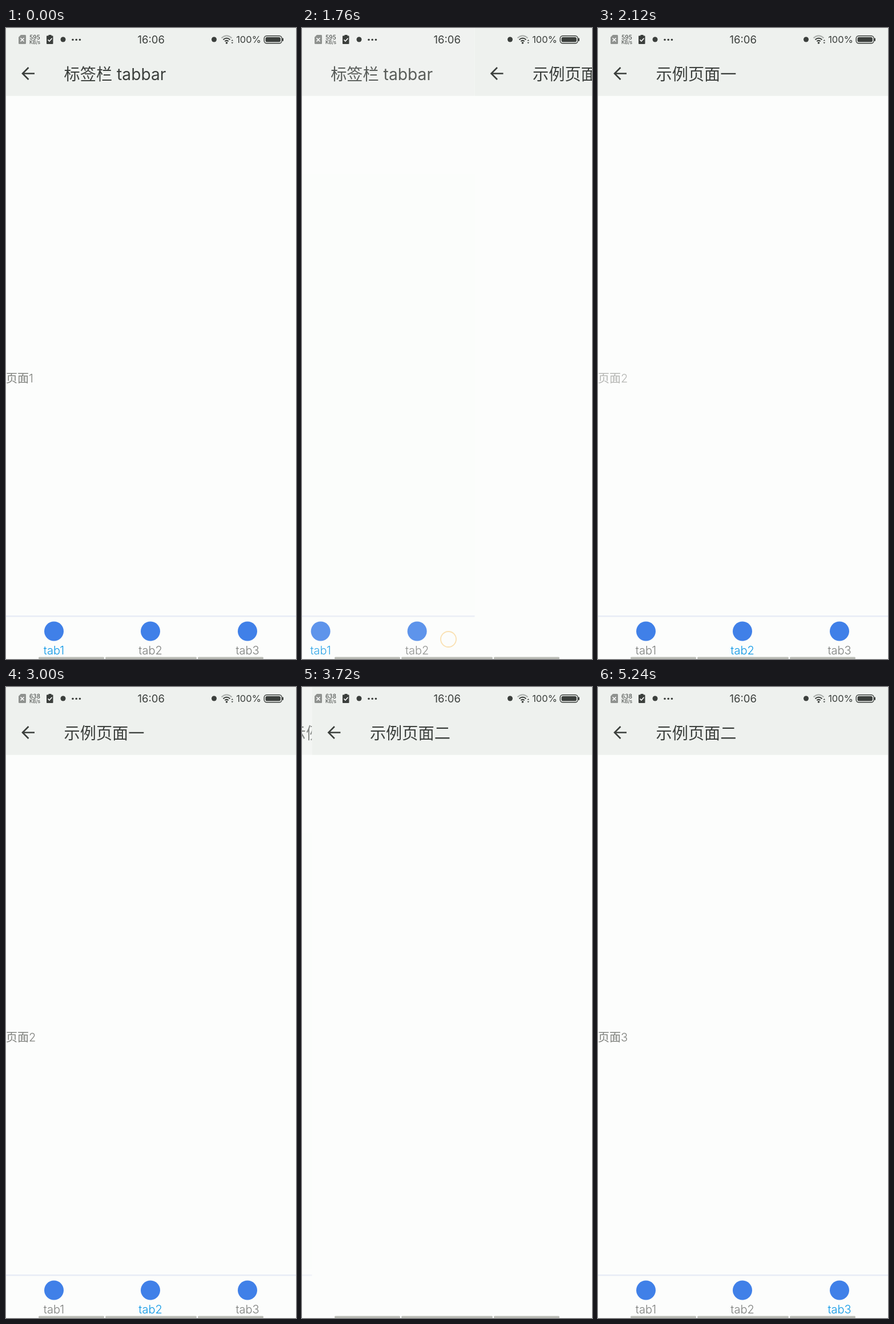
Animation of 508x1102 px, one loop 5.28 s. Source, as an HTML page:

```html
<!DOCTYPE html>
<html lang="zh">
<head>
<meta charset="utf-8">
<title>tabbar</title>
<style>
  html, body { margin: 0; width: 100%; height: 100%; overflow: hidden; background: #fcfdfc; }
  svg { display: block; width: 100vw; height: 100vh; }
  text { font-family: Inter, "Noto Sans CJK SC", "Noto Sans CJK", sans-serif; fill: #3b3f3c; white-space: pre; }
  .title { font-size: 28.2px; }
  .body { font-size: 20px; font-weight: 300; fill: #7d7f7b; }
  .label { font-size: 20px; font-weight: 300; fill: #7d7f7d; text-anchor: middle; }
  .label.on { fill: #0b97e6; }
  .line { fill: none; stroke: #3b3f3c; }
</style>
</head>
<body>
<svg viewBox="0 0 508 1102" preserveAspectRatio="none">
  <rect width="508" height="1102" fill="#fcfdfc"/>
  <g id="pages"></g>

  <g id="status" fill="#3b3f3c">
    <path d="M26 12H33.5Q35 12 35 13.5V26.5Q35 28 33.5 28H23.500Q22 28 22 26.500V16Z" fill="#8f928f"/>
    <path d="M25.500 17.500L31.500 23.500M31.500 17.500L25.500 23.500" stroke="#fff" stroke-width="1.600"/>
    <text id="speed" x="50.500" y="19.500" font-size="10.200" text-anchor="middle"></text>
    <text x="50.500" y="28" font-size="8.600" text-anchor="middle">KB/s</text>
    <path d="M72 13.500H74.500V12H79.500V13.500H81.500Q82.500 13.500 82.500 14.500V27Q82.500 28 81.500 28H72Q71 28 71 27V14.500Q71 13.500 72 13.500Z"/>
    <path d="M73.500 20.500L76 23L80.500 18" fill="none" stroke="#fff" stroke-width="1.600"/>
    <circle cx="100" cy="20" r="4.500"/>
    <circle cx="117" cy="20.500" r="1.800"/>
    <circle cx="123.200" cy="20.500" r="1.800"/>
    <circle cx="129.400" cy="20.500" r="1.800"/>
    <text x="254.300" y="27" font-size="18.500" text-anchor="middle">16:06</text>
    <circle cx="364.500" cy="20" r="4.500"/>
    <g class="line" stroke-width="2">
      <path d="M377.500 17.500Q386.500 9.500 395.500 17.500" stroke="#a9adaa"/>
      <path d="M380.500 20.500Q386.500 15 392.500 20.500"/>
      <path d="M383.300 23.300Q386.500 20.500 389.700 23.300"/>
    </g>
    <circle cx="386.500" cy="26" r="1.800"/>
    <path d="M394.500 22.500L396.300 20.300L398.100 22.500ZM394.500 25L396.300 27.200L398.100 25Z"/>
    <text x="425" y="26.300" font-size="16.500" text-anchor="middle">100%</text>
    <rect class="line" x="452.200" y="13.700" width="31" height="13" rx="4.500" stroke-width="1.400"/>
    <rect x="454.500" y="16" width="26.400" height="8.400" rx="2.500"/>
    <rect x="484" y="17.500" width="2" height="5.500" rx="1"/>
  </g>

  <circle id="tap" r="13.500" fill="none" stroke="#f9d9a0" stroke-width="1.800"/>
  <g fill="#babcb5">
    <rect x="57" y="1098.500" width="115" height="3.500" rx="1.500"/>
    <rect x="174" y="1098.500" width="160" height="3.500" rx="1.500"/>
    <rect x="336" y="1098.500" width="115" height="3.500" rx="1.500"/>
  </g>
</svg>
<script>
const LOOP = 5280, STEP = 40, WIDTH = 508;
const SLIDE_DELAY = 22, SLIDE_TIME = 440;
const titles = ['标签栏 tabbar', '示例页面一', '示例页面二'];
const taps = [{ at: 1600, x: 256.5, y: 1067.5 }, { at: 3360, x: 418.5, y: 1081.5 }];
const tabX = [84, 253, 423];
const $ = id => document.getElementById(id);
const clamp = v => Math.min(1, Math.max(0, v));

const tab = (x, i, page) => `
  <circle cx="${x}" cy="1053.5" r="17" fill="#4080e8"/>
  <text class="label${i === page ? ' on' : ''}" x="${x}" y="1094">tab${i + 1}</text>`;

$('pages').innerHTML = titles.map((title, page) => `<g>
  <rect width="508" height="1102" fill="#fcfdfc"/>
  <rect width="508" height="118.5" fill="#eef1ee"/>
  <path class="line" d="M50 79.500H30M39.500 69L29 79.500L39.500 90" stroke-width="2.600"/>
  <text class="title" x="101.500" y="91">${title}</text>
  <text class="body" x="0" y="619">页面${page + 1}</text>
  <g class="tabs">
    <rect y="1026" width="508" height="2.500" fill="#e8ecf6"/>
    ${tabX.map((x, i) => tab(x, i, page)).join('')}
  </g>
</g>`).join('');

const pages = [...$('pages').children].map(el => ({
  el, body: el.querySelector('.body'), tabs: el.querySelector('.tabs')
}));

// cubic-bezier(.4, 0, .2, 1)
function ease(x) {
  let lo = 0, hi = 1, s = x;
  for (let i = 0; i < 20; i++) {
    s = (lo + hi) / 2;
    const bx = 1.2 * s * (1 - s) ** 2 + 0.6 * s * s * (1 - s) + s ** 3;
    if (bx < x) lo = s; else hi = s;
  }
  return s * s * (3 - 2 * s);
}

function draw(t) {
  const slide = taps.map(p => ease(clamp((t - p.at - SLIDE_DELAY) / SLIDE_TIME)));
  pages.forEach((p, i) => {
    const enter = i ? slide[i - 1] : 1;
    const leave = i < 2 ? slide[i] : 0;
    const x = WIDTH * (1 - enter) - WIDTH / 4 * leave;
    p.el.setAttribute('transform', `translate(${x.toFixed(2)} 0)`);
    p.el.setAttribute('opacity', 1 - 0.4 * leave);
    p.el.style.display = enter > 0.001 && leave < 0.999 ? '' : 'none';
    if (!i) return;
    const since = t - taps[i - 1].at;
    p.body.setAttribute('opacity', clamp((since - 440) / 140));
    p.tabs.setAttribute('opacity', clamp((since - 440) / 80));
  });

  const hit = taps.find(p => t >= p.at && t < p.at + 320);
  $('tap').setAttribute('opacity', hit ? clamp((320 - t + hit.at) / 200) : 0);
  if (hit) $('tap').setAttribute('transform', `translate(${hit.x} ${hit.y})`);
  $('speed').textContent = t < 2680 ? '595' : '638';
}

const start = performance.now();
function tick() {
  const t = (performance.now() - start) % LOOP;
  draw(Math.floor(t / STEP) * STEP);
  requestAnimationFrame(tick);
}
tick();
</script>
</body>
</html>
```
